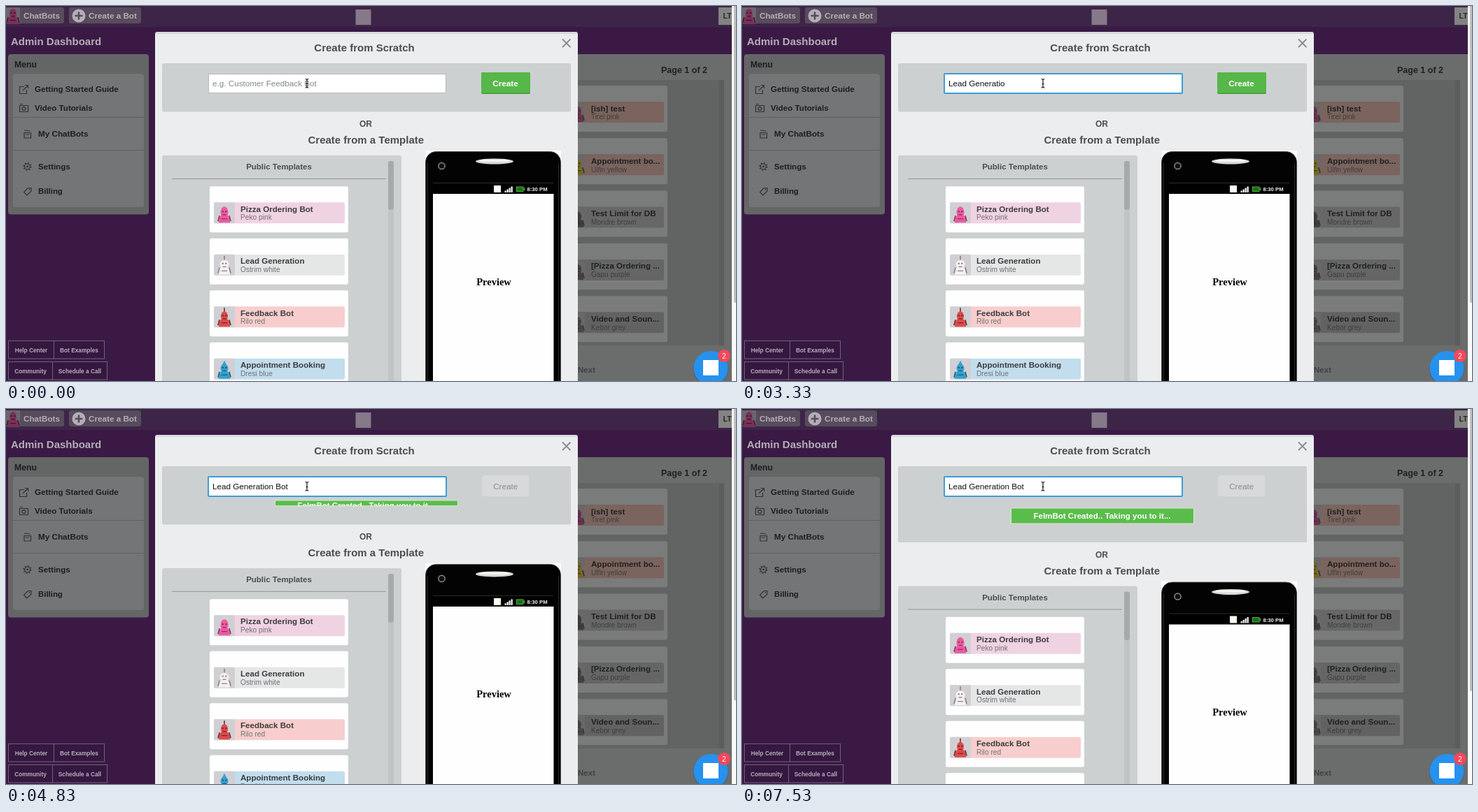
Recreate the animation shown at these times as an HTML page. Size 1043x537 px, loop 8000 ms.

```html
<!DOCTYPE html>
<html lang="en">
<head>
<meta charset="utf-8">
<title>Create a bot</title>
<style>
  html, body { margin: 0; width: 100%; height: 100%; overflow: hidden; background: #3a1a45; }
  svg { display: block; width: 1043px; height: 537px; font-family: "Liberation Sans", Arial, sans-serif; }
  text { white-space: pre; }
</style>
</head>
<body>
<svg id="stage" viewBox="0 0 1043 537" xmlns="http://www.w3.org/2000/svg"></svg>
<script>
const NS = "http://www.w3.org/2000/svg";
const LOOP = 8000;
const stage = document.getElementById("stage");
let layer = stage;

function add(tag, attrs, content) {
  const node = document.createElementNS(NS, tag);
  for (const key in attrs) node.setAttribute(key, attrs[key]);
  if (content !== undefined) node.textContent = content;
  return layer.appendChild(node);
}
const rect = (x, y, width, height, fill, more) => add("rect", { x, y, width, height, fill, ...more });
const path = (d, fill, more) => add("path", { d, fill, ...more });
const line = (d, stroke, width = 1) => path(d, "none", { stroke, "stroke-width": width });
const circle = (cx, cy, r, fill, more) => add("circle", { cx, cy, r, fill, ...more });
const ellipse = (cx, cy, rx, ry, fill) => add("ellipse", { cx, cy, rx, ry, fill });
const label = (x, y, size, str, fill, more) =>
  add("text", { x, y, "font-size": size, fill, ...more }, str);
const bold = (x, y, size, str, fill, more) =>
  label(x, y, size, str, fill, { "font-weight": 700, ...more });
const mid = { "text-anchor": "middle" };

function group(parent, attrs, draw) {
  layer = parent;
  const g = add("g", attrs);
  layer = g;
  draw();
  layer = parent;
  return g;
}

// A little robot standing in a 30 px square.
function robot(x, y, { body, dark, head = [5, 7], top }) {
  const cx = x + 15;
  path(`M${cx - 8} ${y + 29}q0-9 4-11h8q4 2 4 11z`, body);
  path(`M${cx - 9} ${y + 27}l2-8M${cx + 9} ${y + 27}l-2-8`, "none", { stroke: dark, "stroke-width": 1.6 });
  if (top === "cone") path(`M${cx - 4} ${y + 11}L${cx} ${y + 3}l4 8z`, body);
  if (top === "stem") line(`M${cx} ${y + 8}V${y + 2}`, dark, 1.6);
  ellipse(cx, y + 14, head[0], head[1], body);
  rect(cx - 3.4, y + 12, 2.2, 2, dark);
  rect(cx + 1.2, y + 12, 2.2, 2, dark);
  rect(cx - 2.5, y + 17, 5, 1.3, dark);
  line(`M${cx - 4} ${y + 23.5}h8`, dark, 1.2);
}

function drawHeader() {
  rect(0, 0, 1043, 537, "#3a1a45");
  rect(0, 0, 1037, 30, "#3d2547");
  rect(-4, 2, 87, 23, "#574b5c", { rx: 3 });
  rect(0, 2, 20, 23, "#6b666d");
  robot(-5, -3, { body: "#7c2f58", dark: "#3b1a2d" });
  bold(25, 18, 11.7, "ChatBots", "#b5adb8");
  rect(90, 2, 103, 23, "#574b5c", { rx: 3 });
  circle(104, 14, 9.5, "#b5adb8");
  line("M98.5 14h11M104 8.5v11", "#574b5c", 2.6);
  bold(118, 18, 11.7, "Create a Bot", "#b5adb8");
  rect(499.5, 5, 22, 22, "#85798a");
  rect(1018, 2, 19, 25, "#838383");
  bold(1024.5, 18, 10.5, "LT", "#262626");
  bold(7, 55.5, 15, "Admin Dashboard", "#b5adb8");
}

function drawMenu() {
  const ink = "#1d1e20", icon = "#303235";
  rect(3, 69, 201, 229.5, "#646666", { rx: 4 });
  bold(12, 88, 12.2, "Menu", ink);
  rect(10, 97, 187, 191, "#747576", { rx: 4 });
  line("M10 159.5h187M10 206.5h187", "#606162");
  bold(41, 123, 11.6, "Getting Started Guide", ink);
  bold(41, 150, 11.6, "Video Tutorials", ink);
  bold(46, 187, 11.7, "My ChatBots", ink);
  bold(46, 234, 11.6, "Settings", ink);
  bold(46, 269, 11.4, "Billing", ink);

  line("M26 115.5h-6.5v10h10v-5.500M27 113.500h4.500v4.500M31 114l-7 7", icon, 1.2);
  line("M19.500 142.500h12v9h-12zM20 140.500h4", icon, 1.2);
  circle(25.5, 147, 2.4, "none", { stroke: icon, "stroke-width": 1.2 });
  line("M26 181.500h9.500v7.500h-9.500zM26 178l8.500 1M28 184h5.500", icon, 1.2);
  circle(30.5, 230, 4, "none", { stroke: icon, "stroke-width": 1.2 });
  circle(30.5, 230, 5.4, "none", { stroke: icon, "stroke-width": 1.6, "stroke-dasharray": "1.6 2.64" });
  circle(30.5, 230, 1.4, icon);
  line("M25.500 266.500l6-6h4.500v4.500l-6 6z", icon, 1.2);
  circle(33.7, 262.6, 0.9, icon);

  [[3.5, 479.5, 65, "Help Center"], [68.5, 479.5, 72, "Bot Examples"],
   [3.5, 509.5, 63, "Community"], [66.5, 509.5, 78, "Schedule a Call"]].forEach(([x, y, w, str]) => {
    rect(x, y, w, 25.5, "#351740", { stroke: "#70617a" });
    bold(x + w / 2, y + 16, 8.3, str, "#b5adb8", mid);
  });
}

function drawBotList() {
  const ink = "#1f2022";
  rect(600, 69, 437, 468, "#6b6d6d");
  bold(936, 96, 12.5, "Page 1 of 2", ink);
  rect(600, 106, 426, 380, "#626464", { rx: 3 });
  rect(1019, 106, 7, 380, "#5b5d5d");
  const bots = [
    ["[ish] test", "Tirel pink", "#7a645d", "#702e50"],
    ["Appointment bo...", "Ulfin yellow", "#7a645d", "#77661f"],
    ["Test Limit for DB", "Mondre brown", "#676767", "#3c3c3c"],
    ["[Pizza Ordering ...", "Gapu purple", "#656565", "#444047"],
    ["Video and Soun...", "Kebor grey", "#626262", "#484848"]
  ];
  bots.forEach(([name, sub, strip, body], i) => {
    const y = 114 + i * 75.3;
    rect(700, y, 245, 66, "#7a7b7b", { rx: 3 });
    rect(700, y + 23, 240, 30, strip, { rx: 2 });
    rect(798, y + 23, 29, 30, "#686868");
    robot(802, y + 23, { body, dark: "#333" });
    bold(836, y + 36.5, 11.6, name, ink);
    label(836, y + 48.3, 10.1, sub, "#3d3e3f");
  });
  bold(817, 525, 11.6, "Next", "#3f4142");
  rect(1037, 0, 6, 537, "#fafafa");
}

function drawTemplates() {
  rect(223, 214, 342, 420, "#ccd0d1", { rx: 3 });
  bold(390, 234, 11.5, "Public Templates", "#4b4d50", mid);
  line("M237 247.500h306", "#929697");
  rect(546, 222, 8, 400, "#c0c4c5", { rx: 3 });
  rect(546, 222, 8, 69.5, "#a7aaab", { rx: 3 });
  const cards = [
    ["Pizza Ordering Bot", "Peko pink", "#f0d3e2", { body: "#ec5aa0", dark: "#8f2d5e", head: [5.5, 8] }],
    ["Lead Generation", "Ostrim white", "#e5e6e6", { body: "#f3f1f1", dark: "#94797b", head: [6.5, 6], top: "stem" }],
    ["Feedback Bot", "Rilo red", "#f7cecd", { body: "#df4a4b", dark: "#702829", head: [5, 7], top: "stem" }],
    ["Appointment Booking", "Dresi blue", "#c2dded", { body: "#35a0cf", dark: "#1d5876", head: [5.5, 6], top: "cone" }]
  ];
  cards.forEach(([name, sub, strip, look], i) => {
    const y = 258.3 + i * 74.5;
    rect(291, y, 198, 66, "#fefefe", { rx: 3 });
    rect(297, y + 23, 187, 30, strip, { rx: 2 });
    rect(297, y + 23, 30, 30, "#d0d0d4", { rx: 2 });
    robot(297, y + 23, look);
    bold(335, y + 36.3, 11.6, name, "#3b3d40");
    label(335, y + 48, 10.2, sub, "#707275");
  });
}

function drawPhone() {
  rect(599, 207, 194, 420, "#fdfdfd");
  rect(599.5, 208.5, 193, 430, "#030303", { rx: 15, stroke: "#4a4a4a" });
  line("M602.500 225V537M789.500 225V537", "#272727");
  ellipse(698, 222.5, 27, 4, "#d9d9d7");
  rect(677, 220, 42, 3, "#f4f4f2", { rx: 1.5 });
  circle(622.5, 229, 4.6, "#111", { stroke: "#898989", "stroke-width": 1.5 });
  rect(610, 253, 172, 16, "#000");
  line("M610 253.500h172", "#2d2d2d");
  rect(610, 269, 172.5, 368, "#fefefe");
  rect(697, 257, 10, 10, "#fffdf2");
  for (let i = 0; i < 4; i++) rect(712.5 + i * 3, 264.500 - i * 2, 2.3, 2.5 + i * 2, "#f3f3f3");
  rect(729.5, 259, 9.5, 6.5, "#176f17", { stroke: "#51ad44" });
  rect(739.5, 260.5, 1.8, 3.5, "#51ad44");
  bold(744.5, 265, 7.7, "8:30 PM", "#f4f4f4");
  bold(697, 399.500, 14.5, "Preview", "#050505", { ...mid, "font-family": "'Liberation Serif', 'Times New Roman', serif" });
}

drawHeader();
drawMenu();
drawBotList();
const thumb = rect(1040, -4, 4, 429, "#bfbfbf", { rx: 2 });

rect(213, 37, 604, 520, "#d8d9dc", { rx: 3 });
rect(213, 40, 604, 517, "#ecedef", { rx: 2 });
bold(512, 64.5, 15, "Create from Scratch", "#4b4d50", mid);
line("M795 47.500l11.500 11.500M806.500 47.500l-11.500 11.500", "#8b8d8f", 1.8);
const panel = rect(223, 82, 584, 69.5, "#ccd0d1", { rx: 2 });

const input = rect(289.5, 97.5, 339, 27, "#fff", { stroke: "#b7b9ba" });
const focusRing = rect(289, 97, 340, 28, "none", { stroke: "#409cd5", "stroke-width": 2, rx: 1 });
const placeholder = label(295, 115, 11.7, "e.g. Customer Feedback Bot", "#86888a");
const typed = label(295, 115, 11.7, "", "#111");
const caret = rect(295, 104, 1, 14, "#111");
line("M427.500 104.500q2.500 0 2.500 1.500q0-1.500 2.500-1.500M430 105.500v10M427.500 117q2.500 0 2.500-1.500q0 1.500 2.500 1.500M428.500 111.500h3", "#161616", 1.2);

const readyButton = group(stage, {}, () => {
  rect(679, 95, 70, 31, "#439a37", { rx: 2 });
  rect(679, 95, 70, 29.5, "#57b748", { rx: 2 });
  bold(713.5, 114.500, 11.8, "Create", "#fff", mid);
});
const busyButton = group(stage, {}, () => {
  rect(680, 95, 67.5, 30, "#d7d9da", { rx: 2 });
  label(713.7, 114.500, 11.7, "Create", "#898b8d", mid);
});

const clip = add("clipPath", { id: "notice-clip" });
layer = clip;
const clipBox = rect(384, 125, 262, 0, "#000");
layer = stage;
let noticeText;
const notice = rect(384.5, 125, 261, 0, "#5abd4b", { stroke: "#d5ebd0" });
group(stage, { "clip-path": "url(#notice-clip)" }, () => {
  noticeText = bold(514.5, 157, 11.55, "FelmBot Created.. Taking you to it...", "#fff", mid);
});

const lower = group(stage, {}, () => {
  bold(514, 173, 12, "OR", "#4b4d50", mid);
  bold(514.3, 197, 15, "Create from a Template", "#4b4d50", mid);
  drawTemplates();
  drawPhone();
});

circle(1007, 520, 25.5, "#1d4b74", { opacity: 0.25 });
circle(1007, 518.5, 24.5, "#2692ee");
rect(996, 507, 22, 22, "#fff");
circle(1026, 501, 9, "#f4485a");
label(1026, 504.700, 10.5, "2", "#fff", mid);

// [time, typed text, caret visible]
const NAME = "Lead Generation Bot";
const keys = [
  [0, "", false], [150, "", true], [630, "", false],
  ...[1, 2, 3, 4, 5].map((n, i) => [780 + i * 150, NAME.slice(0, n), true]),
  ...[7, 8, 10, 11, 12].map((n, i) => [1680 + i * 150, NAME.slice(0, n), true]),
  [2580, NAME.slice(0, 14), true], [2730, "Lead Generatio ", true],
  [2880, NAME.slice(0, 14), true], [3330, NAME.slice(0, 14), false],
  ...[15, 16, 17, 18, 19].map((n, i) => [3480 + i * 150, NAME.slice(0, n), true]),
  ...[4530, 5130, 5580, 6030, 6630, 7080, 7530].map((t, i) => [t, NAME, i % 2 === 1])
];

// The notice opens with a cosine ease, seen at a 150 ms screen rate.
function openAmount(t) {
  if (t < 4680) return 0;
  const tick = 4680 + Math.floor((t - 4680) / 150) * 150;
  const p = Math.min(1, (tick - 4628) / 500);
  return 0.5 - Math.cos(Math.PI * p) / 2;
}

const show = (node, on) => node.setAttribute("visibility", on ? "visible" : "hidden");

function render(t) {
  const [, str, caretOn] = keys.filter(k => k[0] <= t).pop();
  if (typed.textContent !== str) typed.textContent = str;
  caret.setAttribute("x", Math.floor(295 + (str ? typed.getComputedTextLength() : 0)));
  show(caret, caretOn);
  show(placeholder, !str);
  show(focusRing, t >= 150);
  show(input, true);
  show(readyButton, t < 4230);
  show(busyButton, t >= 4230);

  const open = openAmount(t);
  const shift = 39.5 * open;
  const top = 125 + 17 * open;
  const height = 22 * open;
  panel.setAttribute("height", 69.5 + shift);
  lower.setAttribute("transform", `translate(0 ${shift})`);
  thumb.setAttribute("height", 429 - 21 * open);
  notice.setAttribute("y", top);
  notice.setAttribute("height", height);
  clipBox.setAttribute("y", top);
  clipBox.setAttribute("height", height);
  noticeText.setAttribute("y", top + 9.2 + 6 * open);
  show(notice, open > 0);
}

const start = performance.now();
function frame() {
  render((performance.now() - start) % LOOP);
  requestAnimationFrame(frame);
}
frame();
</script>
</body>
</html>
```
